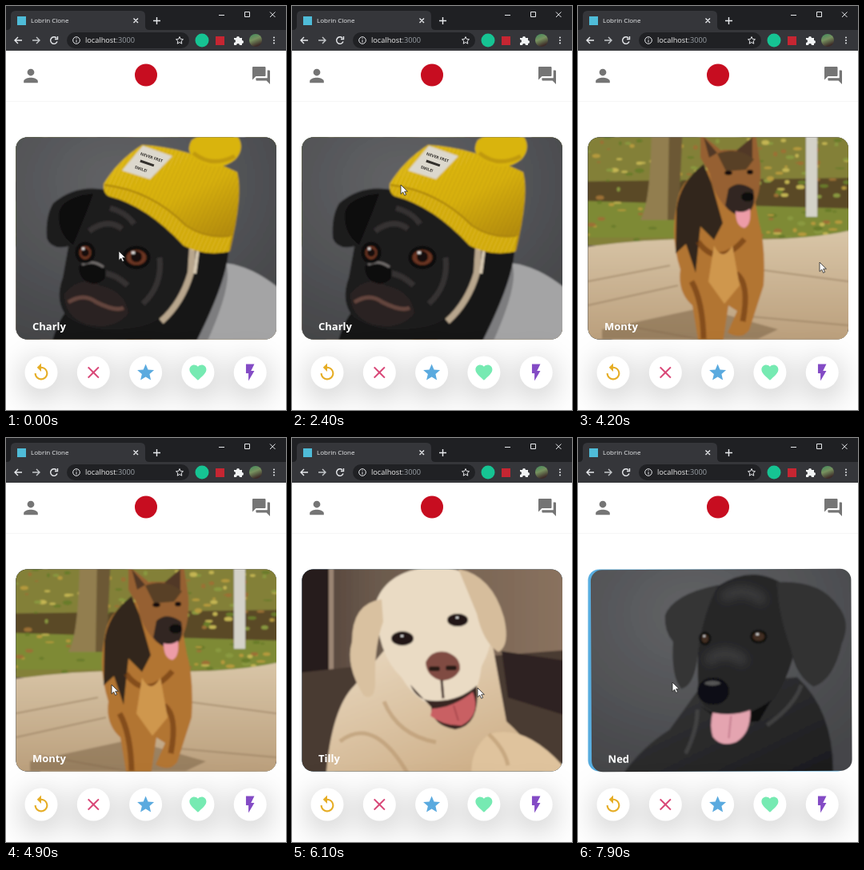
Recreate the animation shown at these times as an HTML page. Size 350x506 px, loop 8 s.

```html
<!DOCTYPE html>
<html lang="en">
<head>
<meta charset="utf-8">
<title>Lobrin Clone</title>
<style>
  html, body { margin: 0; width: 100%; height: 100%; overflow: hidden; background: #fff; }
  svg { display: block; width: 100vw; height: 100vh; }
  text { font-family: "Open Sans", "Noto Sans", sans-serif; }
  .name { font-size: 13px; font-weight: 700; fill: #fff; }
  .photo { filter: url(#soft); }
  .line { fill: none; stroke: #e8eaed; stroke-width: 1.4; }
  #buttons { filter: drop-shadow(0 9px 20px rgba(0, 0, 0, .3)); }
</style>
</head>
<body>
<svg viewBox="0 0 350 506">
  <defs>
    <clipPath id="frame"><rect x="12.5" y="164.5" width="325.5" height="253" rx="14"/></clipPath>
    <filter id="soft" x="-5%" y="-5%" width="110%" height="110%"><feGaussianBlur stdDeviation=".9"/></filter>
    <filter id="blur" x="-50%" y="-50%" width="200%" height="200%"><feGaussianBlur stdDeviation="6"/></filter>
    <radialGradient id="wall" cx=".4" cy=".25" r=".8">
      <stop stop-color="#626366"/><stop offset="1" stop-color="#444548"/>
    </radialGradient>
    <linearGradient id="wool" x2=".6" y2="1">
      <stop stop-color="#e3be18"/><stop offset=".6" stop-color="#d8b10e"/><stop offset="1" stop-color="#b58d08"/>
    </linearGradient>
    <linearGradient id="sand" x2="0" y2="1">
      <stop stop-color="#d9c6a8"/><stop offset="1" stop-color="#b89c79"/>
    </linearGradient>
    <linearGradient id="porch">
      <stop stop-color="#4a3a32"/><stop offset=".3" stop-color="#6b5a4d"/><stop offset="1" stop-color="#8b735f"/>
    </linearGradient>
    <linearGradient id="cream" x2=".5" y2="1">
      <stop stop-color="#eee0ca"/><stop offset="1" stop-color="#cfb18b"/>
    </linearGradient>
    <linearGradient id="coat" x2="1" y2="1">
      <stop stop-color="#39393a"/><stop offset="1" stop-color="#1b1b1c"/>
    </linearGradient>
    <linearGradient id="avatar" x2=".4" y2="1">
      <stop stop-color="#3f8a5c"/><stop offset=".5" stop-color="#77915f"/><stop offset="1" stop-color="#3d2b28"/>
    </linearGradient>
    <pattern id="rib" width="5" height="5" patternUnits="userSpaceOnUse" patternTransform="rotate(24)">
      <path d="M1 0v5" stroke="#8f6d00" stroke-opacity=".3"/>
    </pattern>
    <path id="hat" d="M122 223Q139 194 170 174Q222 176 289 208Q297 235 280 307Q250 315 222 300Q176 250 128 238Q121 234 122 223Z"/>
  </defs>

  <rect width="350" height="506" fill="#fff"/>
  <path d="M0 119.5h350" stroke="#f6f6f6"/>

  <g class="card" clip-path="url(#frame)"><rect x="12" y="164" width="327" height="254" fill="#58addf"/></g>

  <!-- black labrador -->
  <g class="card" clip-path="url(#frame)">
    <g class="photo">
      <rect x="0" y="150" width="350" height="280" fill="url(#wall)"/>
      <path d="M45 430Q70 390 110 365L150 310 270 300Q318 345 314 430Z" fill="url(#coat)"/>
      <path d="M172 185Q220 155 262 190Q285 255 243 325Q215 358 170 344Q142 335 146 308Q145 275 147 245Q150 200 172 185Z" fill="#272728"/>
      <path d="M172 184Q115 195 105 222Q104 242 115 255Q112 298 125 314Q142 310 146 270Q152 220 172 184Z" fill="#353536"/>
      <path d="M245 181Q300 178 322 212Q338 232 326 258Q315 305 290 312Q268 298 262 265Q246 220 245 181Z" fill="#303031"/>
      <path d="M181 198Q205 185 225 202M161 277Q180 262 201 278" fill="none" stroke="#5a5a5b" stroke-width="12" stroke-linecap="round" opacity=".45" filter="url(#blur)"/>
      <path d="M148 335Q190 365 238 328L222 355Q190 358 165 348Z" fill="#101011"/>
      <path d="M164 344Q190 349 211 341Q212 370 193 381Q174 388 164 374Q160 360 164 344Z" fill="#e4a4b0"/>
      <path d="M187 348L184 376" stroke="#c27a8c" stroke-width="2"/>
      <ellipse cx="165" cy="317" rx="20" ry="17" fill="#111112"/>
      <ellipse cx="164" cy="307" rx="10" ry="3" fill="#555"/>
      <g fill="#432f22" stroke="#0b0b0b" stroke-width="3">
        <ellipse cx="155" cy="251" rx="6" ry="7"/><ellipse cx="222" cy="249" rx="9" ry="7"/>
      </g>
      <path d="M219 246h3M153 248h2" stroke="#eee" stroke-width="2"/>
      <path d="M232 360Q267 335 275 310M130 395Q145 365 145 340" fill="none" stroke="#505051" stroke-width="5" opacity=".6"/>
    </g>
    <text class="name" x="33" y="406">Ned</text>
  </g>

  <!-- cream labrador -->
  <g class="card" clip-path="url(#frame)">
    <g class="photo">
      <rect x="0" y="150" width="350" height="280" fill="url(#porch)"/>
      <path d="M0 150H46V300H0Z" fill="#251d1b"/>
      <path d="M46 150h6V296h-6Z" fill="#9b8573"/>
      <path d="M0 295L90 285 350 265V430H0Z" fill="#4a3a33"/>
      <path d="M262 267L350 280V350L270 325Z" fill="#2d2421"/>
      <path d="M78 310Q48 340 42 430H312Q308 390 268 355L250 255 150 225Z" fill="url(#cream)"/>
      <path d="M246 371Q290 357 338 410V430H225Q220 392 246 371Z" fill="#dfc39d"/>
      <path d="M105 205Q120 164 180 161Q232 164 250 204Q257 248 237 286Q230 340 200 343Q158 336 137 300Q105 270 105 205Z" fill="#eadbc4"/>
      <path d="M112 202Q75 207 75 255Q66 285 90 323Q105 330 104 302Q103 260 114 230Z" fill="#d9c1a0"/>
      <path d="M208 164Q250 172 265 225Q273 260 258 268Q239 256 231 220Z" fill="#d6bd9c"/>
      <path d="M148 309Q156 329 176 329Q207 331 231 310Q236 360 204 365Q175 360 174 337Z" fill="#382520"/>
      <path d="M175 339Q201 338 226 318Q237 347 212 360Q190 361 173 348Z" fill="#c96163"/>
      <path d="M202 335L208 354" stroke="#a84a50" stroke-width="2"/>
      <path d="M167 281Q174 265 193 268Q211 274 210 290Q204 303 187 304Q168 299 167 281Z" fill="#804b42"/>
      <path d="M174 289h8M195 288h8" stroke="#291a19" stroke-width="6" stroke-linecap="round"/>
      <path d="M187 303L189 326" stroke="#402c27" stroke-width="3"/>
      <g fill="#201916"><ellipse cx="138" cy="251" rx="14" ry="9"/><ellipse cx="207" cy="228" rx="13" ry="8"/></g>
      <path d="M136 248h3M205 225h3" stroke="#eee" stroke-width="2"/>
      <path d="M115 330Q132 372 180 381M246 371Q266 390 270 410M60 380Q105 345 150 430" fill="none" stroke="#b4926b" stroke-width="5" opacity=".55"/>
    </g>
    <text class="name" x="33" y="406">Tilly</text>
  </g>

  <!-- shepherd -->
  <g class="card" clip-path="url(#frame)">
    <g class="photo">
      <rect x="0" y="150" width="350" height="150" fill="#838039"/>
      <path d="M0 220L350 215V258L0 244Z" fill="#5a4928"/>
      <path d="M0 244L350 254V290H0Z" fill="#7e8a35"/>
      <g id="leaves"></g>
      <path d="M92 150H131L126 235Q131 255 142 268H78Q91 246 92 150Z" fill="#927e4f"/>
      <path d="M114 150L112 268H142Q128 254 127 235L131 150Z" fill="#6c5934"/>
      <rect x="285" y="150" width="14" height="114" fill="#d4d2c8"/>
      <path d="M0 303Q95 289 190 292T350 279V430H0Z" fill="url(#sand)"/>
      <path d="M12 345L115 325M12 375L125 350M205 388L338 400M225 330L338 345M40 397L150 417" stroke="#8c7355" stroke-width="2" opacity=".5"/>
      <path d="M30 405L155 378 250 405 225 417H30Z" fill="#7d6548" opacity=".55"/>
      <path d="M154 205Q127 218 123 250Q115 290 128 330Q124 358 143 375L152 430H180L188 375 199 382 187 409Q204 419 214 406L232 350Q235 300 226 270L215 210Z" fill="#b27431"/>
      <path d="M157 198Q127 221 123 255L122 310 135 298 147 334 153 276 170 293 181 272 167 222Z" fill="#33271c"/>
      <path d="M142 345Q156 370 157 417M198 335Q215 348 206 395M150 295Q175 330 208 292" fill="none" stroke="#713f18" stroke-width="7" opacity=".7"/>
      <path d="M170 300Q181 322 193 300L202 350 183 373 163 345Z" fill="#cf974e"/>
      <path d="M153 160L178 180 202 180 222 160 228 198Q230 234 218 253Q206 266 187 255Q167 233 165 210L153 190Z" fill="#966131"/>
      <path d="M157 164L174 184 164 190ZM218 164L198 181 218 194Z" fill="#513725"/>
      <path d="M174 185Q200 175 220 192L210 205 185 207Z" fill="#584027"/>
      <path d="M188 229Q201 217 219 230Q223 248 214 258Q197 268 184 250Z" fill="#302722"/>
      <path d="M197 257Q207 260 215 254Q217 274 208 278Q197 276 197 257Z" fill="#ed9ca7"/>
      <ellipse cx="212" cy="239" rx="8" ry="6" fill="#111"/>
      <g fill="#17110c"><ellipse cx="188" cy="209" rx="5" ry="3"/><ellipse cx="215" cy="208" rx="4" ry="3"/></g>
    </g>
    <text class="name" x="33" y="406">Monty</text>
  </g>

  <!-- pug with woolly hat -->
  <g class="card" clip-path="url(#frame)">
    <g class="photo">
      <rect x="0" y="150" width="350" height="280" fill="url(#wall)"/>
      <path d="M274 322Q311 326 350 361V430H220Z" fill="#a4a4a5"/>
      <path d="M275 323Q285 348 247 430H215L257 340Z" fill="#7d7d7f"/>
      <path d="M190 245L278 300Q280 338 233 430H55Q65 390 80 378Z" fill="#121213"/>
      <path d="M124 230Q87 223 59 247Q49 263 51 291Q57 306 78 301L71 340Q60 370 77 390Q108 411 155 404Q205 400 230 345L240 295Z" fill="#1c1a1b"/>
      <path d="M109 235Q70 239 66 260Q65 286 84 299L101 257Z" fill="#0d0d0e"/>
      <path d="M104 282Q126 265 145 279M100 340Q125 325 152 350M192 315Q196 350 171 373M130 253Q151 259 160 273" fill="none" stroke="#514b4a" stroke-width="7" opacity=".5"/>
      <path d="M73 360Q95 336 117 350Q150 357 153 385Q135 407 101 399Q72 389 73 360Z" fill="#292222"/>
      <path d="M78 371Q97 359 113 371Q137 383 147 378" fill="none" stroke="#64453d" stroke-width="5"/>
      <path d="M91 326Q108 315 124 330Q128 345 110 348Q91 345 91 326Z" fill="#0d0d0e"/>
      <path d="M95 324Q108 317 122 327" fill="none" stroke="#706c6b" stroke-width="3"/>
      <g fill="#6a3421" stroke="#080708" stroke-width="5">
        <ellipse cx="99" cy="309" rx="10" ry="11"/><ellipse cx="163" cy="315" rx="15" ry="12"/>
      </g>
      <g fill="#140d0b"><circle cx="99" cy="309" r="5"/><circle cx="163" cy="314" r="7"/></g>
      <path d="M95 304h3M157 309h4" stroke="#eee" stroke-width="3"/>
      <path d="M233 302L231 334Q220 372 194 395" fill="none" stroke="#b8a68d" stroke-width="8"/>
      <path d="M232 304L240 304 236 335" fill="none" stroke="#d8cab3" stroke-width="4"/>
      <use href="#hat" fill="url(#wool)"/>
      <path d="M122 223Q181 231 225 274Q252 293 282 288L278 308Q245 313 222 300Q176 250 128 238Z" fill="#d8b112"/>
      <use href="#hat" fill="url(#rib)"/>
      <path d="M123 224Q182 231 225 275Q250 292 280 288" fill="none" stroke="#a98208" stroke-width="2"/>
      <path d="M232 168Q252 153 290 164Q299 178 287 192Q266 209 242 195Q222 185 232 168Z" fill="#d9b40f"/>
      <path d="M234 184Q257 203 286 188" fill="none" stroke="#a78005" stroke-width="5" opacity=".5"/>
      <path d="M171 175L208 188 180 217 145 206Z" fill="#dcd8cd"/>
    </g>
    <g transform="rotate(19 177 195)" font-size="5" font-weight="700" fill="#33302c" text-anchor="middle">
      <text x="180" y="190">NEVER FRET</text><path d="M168 197h18" stroke="#33302c" stroke-width="3"/><text x="172" y="208">SMILE!</text>
    </g>
    <text class="name" x="33" y="406">Charly</text>
  </g>

  <g id="buttons" fill="#fff"></g>
  <g id="icons"></g>
  <circle cx="175" cy="86.5" r="14" fill="#c70d20"/>

  <g id="scrollbar">
    <rect y="494" width="350" height="12" fill="#f1f1f1"/>
    <rect id="thumb" x="12" y="495.5" height="8.5" fill="#c1c1c1"/>
    <path d="M7.5 497v6l-3.5-3Z" fill="#a3a3a3"/><path d="M342.5 497v6l3.5-3Z" fill="#505050"/>
  </g>

  <!-- browser chrome -->
  <rect width="350" height="31" fill="#1f2023"/>
  <rect y="30" width="350" height="26" fill="#35363a"/>
  <path d="M1 30Q6 30 6 25V12Q6 6 12 6H168Q174 6 174 12V25Q174 30 179 30Z" fill="#35363a"/>
  <rect x="14" y="13" width="11" height="11" fill="#4fbcd8"/>
  <text x="31" y="21.3" font-size="8" fill="#eceef0">Lobrin Clone</text>
  <g class="line">
    <path d="M159.5 15.5l5.5 5.5m0-5.5l-5.5 5.5M184 18.5h9m-4.5-4.5v9"/>
    <path d="M266 11.5h7M298.5 7.5h6v6h-6ZM330 7.5l6.5 6.5m0-6.5l-6.5 6.5" style="stroke-width:1"/>
    <path d="M20 43H11m4-4l-4 4 4 4"/>
    <path d="M33 43h9m-4-4l4 4-4 4" stroke="#c4c7ca"/>
    <path d="M63 40a4.3 4.3 0 1 0 1 4.5M64.5 38v3.5H61"/>
  </g>
  <rect x="76" y="33" width="153" height="20" rx="10" fill="#202124"/>
  <g class="line" style="stroke-width:1">
    <circle cx="88" cy="43" r="4.3"/><path d="M88 42.5v3M88 40.3v1"/>
    <path d="M217 38.5l1.3 3 3.2.3-2.4 2.2.7 3.2-2.8-1.7-2.8 1.7.7-3.2-2.4-2.2 3.2-.3Z"/>
  </g>
  <text x="99" y="46.3" font-size="9.2" fill="#eee">localhost<tspan fill="#9aa0a6">:3000</tspan></text>
  <circle cx="245" cy="43" r="8.5" fill="#16c493"/>
  <rect x="262" y="38" width="11" height="11" fill="#c62632"/>
  <path d="M285 40h3a2 2 0 1 1 4 0h3v3a2 2 0 1 1 0 4v2h-3a2 2 0 0 0-4 0h-3v-3a2 2 0 0 0 0-4Z" fill="#f1f3f4"/>
  <circle cx="312" cy="43" r="8" fill="url(#avatar)"/>
  <path d="M335 39.5v.01M335 43v.01M335 46.5v.01" stroke="#e8eaed" stroke-width="2" stroke-linecap="round"/>

  <path id="cursor" d="M0 0v11.5l2.7-2.5 1.9 4.2 2-.9-1.9-4.1h3.7Z" fill="#fff" stroke="#222" stroke-width=".8"/>
</svg>

<script>
const LOOP = 8000, STEP = 100;
const $ = id => document.getElementById(id);
const rad = deg => deg * Math.PI / 180;

function add(parent, tag, attrs) {
  const el = document.createElementNS("http://www.w3.org/2000/svg", tag);
  for (const key in attrs) el.setAttribute(key, attrs[key]);
  parent.append(el);
}

function icon(x, y, fill, d, scale = 1.05) {
  add($("icons"), "path", { d, fill, transform: `translate(${x} ${y}) scale(${scale}) translate(-12 -12)` });
}

icon(31, 87.5, "#757575", "M12 12c2.2 0 4-1.8 4-4s-1.8-4-4-4-4 1.8-4 4 1.8 4 4 4zm0 2c-2.7 0-8 1.3-8 4v2h16v-2c0-2.7-5.3-4-8-4z", 1.1);
icon(319, 87, "#757575", "M21 6h-2v9H6v2c0 .5.5 1 1 1h11l4 4V7c0-.5-.5-1-1-1zm-4 6V3c0-.5-.5-1-1-1H3c-.5 0-1 .5-1 1v14l4-4h10c.5 0 1-.5 1-1z", 1.1);

[
  ["#e6ad25", "M12 5V1L7 6l5 5V7c3.3 0 6 2.7 6 6s-2.7 6-6 6-6-2.7-6-6H4c0 4.4 3.6 8 8 8s8-3.6 8-8-3.6-8-8-8z"],
  ["#d94878", "M19 6.4L17.6 5 12 10.6 6.4 5 5 6.4 10.6 12 5 17.6 6.4 19 12 13.4 17.6 19 19 17.6 13.4 12z"],
  ["#5aaadf", "M12 17.3L18.2 21l-1.6-7L22 9.2l-7.2-.6L12 2 9.2 8.6 2 9.2 7.5 14 5.8 21z"],
  ["#76eab2", "M12 21.3l-1.4-1.3C5.4 15.4 2 12.3 2 8.5 2 5.4 4.4 3 7.5 3c1.7 0 3.4.8 4.5 2.1C13.1 3.8 14.8 3 16.5 3 19.6 3 22 5.4 22 8.5c0 3.8-3.4 6.9-8.5 11.5z"],
  ["#834bc5", "M7 2v11h3v9l7-12h-4l4-8z"]
].forEach(([color, d], i) => {
  const x = 44 + i * 65.3;
  add($("buttons"), "circle", { cx: x, cy: 459, r: 20.5 });
  icon(x, 459, color, d);
});

let seed = 7;
const random = () => (seed = seed * 16807 % 2147483647) / 2147483647;
const leafColors = ["#b69a3c", "#697b2b", "#c4b552", "#9c7034", "#8a9940"];
for (let i = 0; i < 170; i++) {
  add($("leaves"), "ellipse", {
    cx: 12 + random() * 326, cy: 165 + random() * 132,
    rx: 2 + random() * 4, ry: 1 + random() * 2, fill: leafColors[i % 5]
  });
}

// Keys are [time, x, y, rotation]; cards disappear at their end time.
const swipes = [
  { end: 4000, keys: [[3300, 0, 0, 0], [3500, 4, 1, 1], [3600, 114.5, 10, 11], [3700, 230, 20, 13], [3900, 390, 30, 13]] },
  { end: 5700, keys: [[5000, 0, 0, 0], [5100, 20, 0, 2], [5200, 95, -2, 5], [5300, 205, -3, 5.8], [5400, 295, -2, 6], [5600, 400, -2, 6]] },
  { end: 7000, keys: [[6500, 0, 0, 0], [6600, -25, 2, -4], [6700, -120, 5, -12], [6800, -250, 9, -13], [6900, -345, 10, -13]] },
  { end: LOOP, keys: [[7700, 0, 0, 0], [7800, 1, 0, 0], [7900, 4, 0, -.3]] }
];
const pointer = [
  [0, 141, 307], [1700, 141, 307], [2400, 136, 224], [2600, 145, 238], [3300, 193, 308],
  [3500, 197, 309], [3600, 307, 318], [3700, 310, 320], [4200, 302, 321], [4900, 132, 309],
  [5000, 132, 309], [5100, 152, 309], [5200, 227, 307], [5300, 337, 306], [5400, 338, 306],
  [6100, 232, 313], [6500, 235, 314], [6600, 210, 316], [6700, 115, 319], [6800, 92, 318],
  [7100, 114, 306], [7700, 114, 306], [7900, 118, 306]
];

function sample(keys, t) {
  const next = keys.findIndex(key => key[0] > t);
  if (next === 0) return keys[0].slice(1);
  if (next < 0) return keys.at(-1).slice(1);
  const a = keys[next - 1], b = keys[next];
  const p = (t - a[0]) / (b[0] - a[0]);
  return a.slice(1).map((v, i) => v + (b[i + 1] - v) * p);
}

const cards = [...document.querySelectorAll(".card")].reverse();

function draw(t) {
  let pageWidth = 350;
  swipes.forEach(({ end, keys }, i) => {
    const visible = t < end;
    const [x, y, turn] = sample(keys, t);
    cards[i].style.display = visible ? "" : "none";
    cards[i].setAttribute("transform", `translate(${x} ${y}) rotate(${turn} 175 291)`);
    const right = 175 + x + 162.75 * Math.cos(rad(turn)) + 126.5 * Math.sin(rad(Math.abs(turn)));
    if (visible) pageWidth = Math.max(pageWidth, right);
  });
  $("scrollbar").style.display = pageWidth > 350 ? "" : "none";
  $("thumb").setAttribute("width", 326 * 350 / pageWidth);
  $("cursor").setAttribute("transform", `translate(${sample(pointer, t)})`);
}

const start = performance.now();
function tick() {
  const t = (performance.now() - start) % LOOP;
  draw(Math.floor(t / STEP) * STEP);
  requestAnimationFrame(tick);
}
tick();
</script>
</body>
</html>
```
